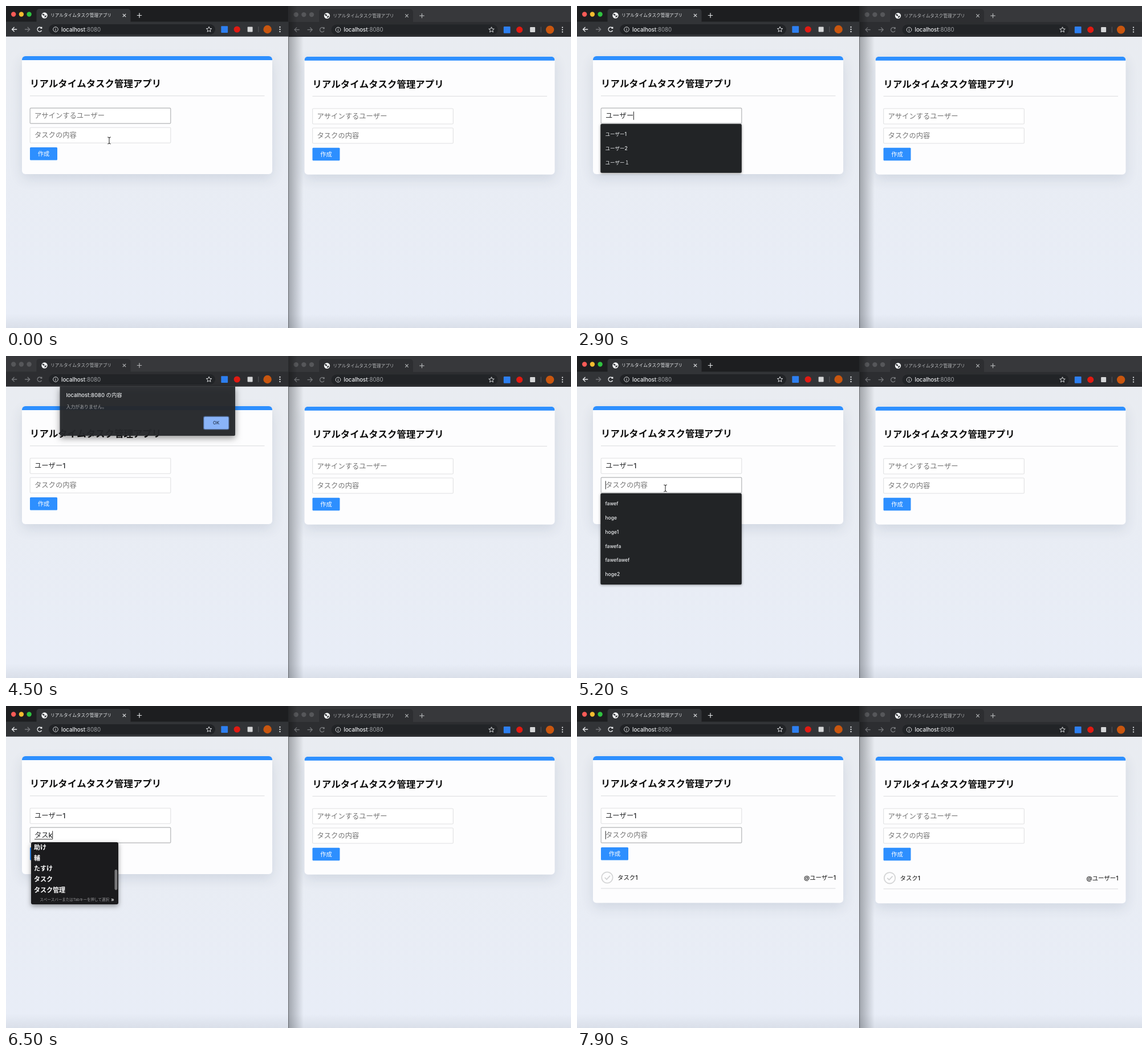
These frames come from a looping animation (991 px wide and 565 px high, 8000 ms). An HTML page with a canvas:

```html
<!DOCTYPE html>
<html lang="ja">
<head>
<meta charset="utf-8">
<style>
html, body { margin: 0; width: 100%; height: 100%; overflow: hidden; background: #e9edf4; }
canvas { display: block; width: 991px; height: 565px; }
</style>
</head>
<body>
<canvas id="stage"></canvas>
<script>
const W = 991, H = 565, LOOP = 8000;
const FONT = 'Inter, "Noto Sans CJK JP", "Noto Sans CJK", sans-serif';
const TITLE = 'リアルタイムタスク管理アプリ';
const canvas = document.getElementById('stage');
const dpr = window.devicePixelRatio || 1;
canvas.width = W * dpr;
canvas.height = H * dpr;
const c = canvas.getContext('2d');

// [start ms, text, composing]
const userSteps = [
  [0, ''], [1200, 'y', 1], [1300, 'ゆ', 1], [1500, 'ゆー', 1], [1700, 'ゆーz', 1],
  [1800, 'ゆーざ', 1], [2000, 'ゆーざー', 1], [2300, 'ユーザー', 1], [2600, 'ユーザー'], [3300, 'ユーザー1']
];
const taskSteps = [
  [0, ''], [5700, 't', 1], [5800, 'た', 1], [6000, 'たs', 1], [6100, 'たす', 1], [6300, 'タスk', 1],
  [6600, 'タスク', 1], [6900, 'タスク'], [7100, 'タスク1'], [7400, '']
];
const DIALOG = [3900, 4700], TASK_ADDED = 7400;

const stepAt = (steps, t) => steps.filter(s => s[0] <= t).pop();
const within = (t, a, b) => t >= a && t < b;
const clamp = v => Math.max(0, Math.min(1, v));

function rect(x, y, w, h, fill, r = 0) {
  c.fillStyle = fill;
  c.beginPath();
  c.roundRect(x, y, w, h, r);
  c.fill();
}

function frame(x, y, w, h, color, r = 0, lw = 1) {
  c.strokeStyle = color;
  c.lineWidth = lw;
  c.beginPath();
  c.roundRect(x, y, w, h, r);
  c.stroke();
}

function disc(x, y, r, fill) {
  c.fillStyle = fill;
  c.beginPath();
  c.arc(x, y, r, 0, 7);
  c.fill();
}

function ring(x, y, r, color, lw = 1.2, a = 0, b = Math.PI * 2) {
  c.strokeStyle = color;
  c.lineWidth = lw;
  c.beginPath();
  c.arc(x, y, r, a, b);
  c.stroke();
}

function line(points, color, lw = 1) {
  c.strokeStyle = color;
  c.lineWidth = lw;
  c.beginPath();
  for (let i = 0; i < points.length; i += 2) c.lineTo(points[i], points[i + 1]);
  c.stroke();
}

// y is the visual middle of the line
function text(s, x, y, size, color, weight = 400, align = 'left') {
  c.font = `${weight} ${size}px ${FONT}`;
  c.textAlign = align;
  c.fillStyle = color;
  c.fillText(s, x, y + size * 0.38);
  return c.measureText(s).width;
}

function shadow(blur, dy, color) {
  c.shadowBlur = blur * dpr;
  c.shadowOffsetY = dy * dpr;
  c.shadowColor = color;
}
const noShadow = () => shadow(0, 0, 'transparent');

function fade(x0, y0, x1, y1, from, to) {
  const g = c.createLinearGradient(x0, y0, x1, y1);
  g.addColorStop(0, from);
  g.addColorStop(1, to);
  return g;
}

function arrow(x, y, dir, color) {
  line([x - 4.2 * dir, y, x + 4.2 * dir, y], color, 1.3);
  line([x + 0.4 * dir, y - 4, x + 4.4 * dir, y, x + 0.4 * dir, y + 4], color, 1.3);
}

function star(x, y, r, color) {
  const p = [];
  for (let i = 0; i <= 10; i++) {
    const a = i * Math.PI / 5 - Math.PI / 2, q = i % 2 ? r * 0.45 : r;
    p.push(x + q * Math.cos(a), y + q * Math.sin(a));
  }
  line(p, color, 1);
}

function globe(x, y) {
  disc(x, y, 5.2, '#f1f3f4');
  c.fillStyle = '#35363a';
  c.beginPath();
  c.ellipse(x - 1.8, y - 1.2, 2.3, 1.3, 0.6, 0, 7);
  c.ellipse(x + 1.7, y + 1.7, 2.2, 1.2, -0.7, 0, 7);
  c.fill();
}

function chrome(active) {
  const strip = active ? '#1d1e20' : '#37383b';
  const bar = active ? '#323437' : '#2d2e31';
  const lights = active ? ['#fc5b57', '#f5bc2f', '#30c440'] : ['#56575a', '#56575a', '#56575a'];
  const nav = active ? '#eceef0' : '#77797c';
  const label = active ? '#e4e6e8' : '#b4b6b8';
  rect(0, 0, 495.5, 28, strip);
  rect(0, 27.5, 495.5, 26, bar);
  rect(53.5, 5, 165, 24, bar, [5, 5, 0, 0]);
  rect(75, 32, 292, 18, active ? '#212326' : '#222427', 9);
  lights.forEach((col, i) => disc(13.2 + i * 13.7, 14.5, 4.2, col));
  globe(67.5, 16.5);
  text(TITLE, 78, 16.5, 7.65, label, 500);
  line([204.8, 13.8, 210.2, 19.2], label, 1.1);
  line([210.2, 13.8, 204.8, 19.2], label, 1.1);
  line([229.8, 16.5, 238.2, 16.5], label, 1.2);
  line([234, 12.3, 234, 20.7], label, 1.2);

  arrow(15, 41, -1, nav);
  arrow(37.3, 41, 1, '#77797c');
  ring(59, 41, 3.9, nav, 1.4, 0.5, 5.5);
  rect(60.4, 36.8, 3, 3, nav);
  ring(87, 41, 4.3, '#d5d7d9', 1);
  line([87, 40.2, 87, 43.5], '#d5d7d9', 1);
  line([87, 38.3, 87, 39.2], '#d5d7d9', 1);
  const w = text('localhost', 97, 41, 9.7, '#eceef0', 500);
  text(':8080', 97 + w, 41, 9.7, '#9ea1a4');
  star(356, 41.2, 5, '#d8dadc');
  rect(377.3, 35.3, 11.8, 11.8, '#2d7ff0', 1);
  disc(405.2, 41, 5.6, '#e01a12');
  rect(423.6, 36.5, 9, 9, '#d5d6d7', 1);
  rect(442.3, 36, 1, 10, '#57595c');
  disc(458.6, 41, 7.2, '#c8560f');
  [37, 41, 45].forEach(y => disc(480.5, y, 1.15, '#e4e6e8'));
}

function field(y, value, hint, focused, composing, caret) {
  rect(42, y, 247, 27.5, '#fff', 1.5);
  frame(42.2, y + 0.2, 246.6, 27, focused ? '#b2b4b6' : '#dfe0e1', 1.5, focused ? 1.2 : 1.1);
  const mid = y + 13.5;
  let end = 50;
  if (value) {
    end += text(value, 50, mid, 12.3, '#26282a', 500);
    if (composing) rect(50, mid + 6.7, end - 50, 1, '#333');
  } else {
    text(hint, 50, mid, 12.3, '#757575');
  }
  if (focused && caret) rect(end - 0.3, mid - 7.2, 1, 14.5, '#222');
}

function taskRow() {
  ring(53, 301, 9.7, '#d5d6d7', 1.8);
  line([48.7, 301, 52, 304.3, 58, 297.8], '#d0d1d2', 1.7);
  text('タスク1', 71, 301.2, 10.4, '#111', 500);
  text('@ユーザー1', 454, 301.2, 10.4, '#111', 500, 'right');
  rect(42, 319.5, 411.5, 1.3, '#e1e2e4');
}

function page(s) {
  rect(0, 53.5, 496, 512, fade(0, 54, 0, 565, '#e9ecf1', '#e8edf7'));
  rect(0, 540, 496, 25, fade(0, 540, 0, 565, 'rgba(90,100,110,0)', 'rgba(90,100,110,.1)'));
  const bottom = 295 + 50.5 * s.grow;
  shadow(22, 8, 'rgba(40,60,90,.13)');
  rect(28, 88, 439, bottom - 88, '#fdfdfe', 6);
  noShadow();
  c.save();
  c.beginPath();
  c.roundRect(28, 88, 439, bottom - 88, 6);
  c.clip();
  rect(28, 88, 439, 7, '#2d8fff');
  c.restore();
  text(TITLE, 42, 135.6, 16.45, '#0c0c0c', 700);
  rect(42, 157, 411.5, 1.3, '#e1e2e4');
  field(179, s.user[1], 'アサインするユーザー', s.focus === 1, s.user[2], s.caret);
  field(213, s.task[1], 'タスクの内容', s.focus === 2, s.task[2], s.caret);
  rect(42, 248, 48, 22.5, '#2d8fff', 1.5);
  text('作成', 66, 259.2, 10.3, '#fff', 500, 'center');
  if (s.grow > 0) {
    c.globalAlpha = s.grow;
    taskRow();
    c.globalAlpha = 1;
  }
}

function suggestions(y, items) {
  const h = 11.5 + items.length * 24.75;
  shadow(4, 1, 'rgba(0,0,0,.4)');
  rect(41.3, y, 247.5, h, '#222426', 2);
  noShadow();
  items.forEach((s, i) => text(s, 49.5, y + 18.2 + i * 24.75, 8.5, '#eceef0', 500));
}

function candidates() {
  shadow(9, 3, 'rgba(0,0,0,.4)');
  rect(44, 239, 153, 109, '#1b1b1d', 3);
  noShadow();
  ['助け', '輔', 'たすけ', 'タスク', 'タスク管理'].forEach((s, i) =>
    text(s, 49, 248 + i * 18.6, 11, '#fff', 700));
  rect(190.5, 287, 4.8, 36, '#78787a', 2.4);
  text('スペースバーまたはTabキーを押して選択', 181, 340, 6.5, '#98989a', 400, 'right');
  text('»', 184, 339.5, 9, '#e2e2e2', 600);
}

function dialog(alpha) {
  c.globalAlpha = alpha;
  shadow(12, 4, 'rgba(0,0,0,.45)');
  rect(94.5, 53.5, 307.5, 86.5, 'rgba(38,40,43,.94)', [0, 0, 2, 2]);
  noShadow();
  text('localhost:8080 の内容', 105.5, 68.5, 9.4, '#eceef0', 500);
  text('入力がありません。', 105.5, 88.8, 7.9, '#a0a2a5');
  rect(346, 105.5, 45.5, 24, '#4c6690', 3);
  rect(347.3, 106.8, 43, 21.5, '#8ab4f8', 2);
  text('OK', 368.7, 117.4, 7.8, '#26364f', 500, 'center');
  c.globalAlpha = 1;
}

function iBeam(x, y) {
  for (const [color, lw] of [['rgba(255,255,255,.8)', 2.4], ['#333', 1.1]]) {
    line([x, y - 5, x, y + 5], color, lw);
    line([x - 2.8, y - 6, x - 1, y - 5.6, x, y - 4.6, x + 1, y - 5.6, x + 2.8, y - 6], color, lw);
    line([x - 2.8, y + 6, x - 1, y + 5.6, x, y + 4.6, x + 1, y + 5.6, x + 2.8, y + 6], color, lw);
  }
}

function draw(t) {
  c.setTransform(dpr, 0, 0, dpr, 0, 0);
  const modal = within(t, ...DIALOG);
  const blank = [0, ''];
  const grow = t >= TASK_ADDED ? clamp((t - TASK_ADDED + 100) / 200) : 0;
  const s = {
    user: stepAt(userSteps, t),
    task: stepAt(taskSteps, t),
    focus: modal ? 0 : t < 5000 ? 1 : 2,
    grow
  };
  s.caret = s.user[2] || s.task[2] || within(t, 2600, 3700) || Math.floor((t + 400) / 500) % 2 === 1
    || within(t, 5000, 5500) || t >= 7600;
  if (t < 300) s.caret = false;

  c.save();
  c.translate(495.5, 0.8);
  page({ user: blank, task: blank, focus: 0, grow });
  c.translate(0, -0.2);
  rect(0, -1, 496, 2, '#37383b');
  chrome(false);
  c.restore();
  rect(495.5, 54, 27, 511, fade(495.5, 0, 522, 0, 'rgba(35,40,45,.36)', 'rgba(35,40,45,0)'));
  rect(495.5, 0, 16, 54, fade(495.5, 0, 511, 0, 'rgba(0,0,0,.3)', 'rgba(0,0,0,0)'));

  c.save();
  c.beginPath();
  c.rect(0, 0, 495.5, H);
  c.clip();
  page(s);
  chrome(!modal);
  if (within(t, 2600, 3300)) suggestions(207, ['ユーザー1', 'ユーザー2', 'ユーザー１']);
  if (within(t, 3300, 3700)) suggestions(207, ['ユーザー1']);
  if (within(t, 5100, 5700)) suggestions(241, ['fawef', 'hoge', 'hoge1', 'fawefa', 'fawefawef', 'hoge2']);
  if (within(t, 6300, 6900)) candidates();
  if (modal) dialog(clamp((t - DIALOG[0] + 60) / 160));
  if (t < 1200) iBeam(181, 236);
  if (within(t, 4800, 5700)) {
    const k = clamp((t - 4800) / 250), e = k * k * (3 - 2 * k);
    iBeam(181 - 26 * e, 236 - 4 * e);
  }
  c.restore();
  rect(495, 0, 1, H, 'rgba(40,42,45,.6)');
}

function tick(now) {
  draw(now % LOOP);
  requestAnimationFrame(tick);
}
draw(0);
requestAnimationFrame(tick);
</script>
</body>
</html>
```
